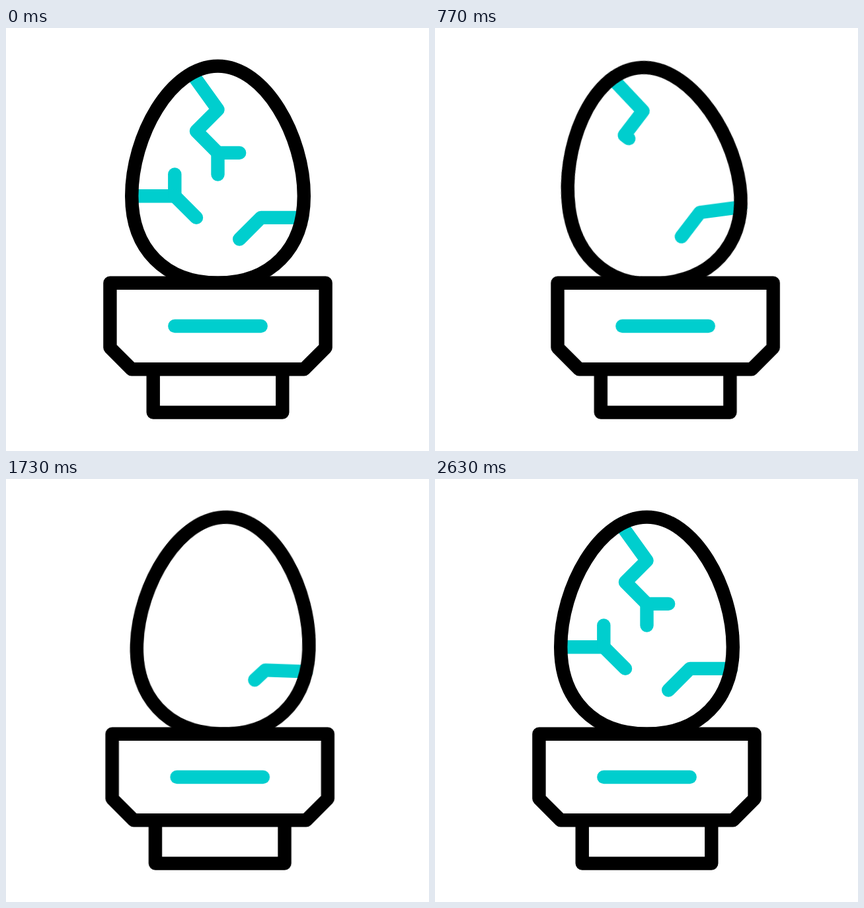
An HTML page without scripts for the animation above (2.97 s loop, 640 by 640 pixels).

```html
<!DOCTYPE html>
<html lang="en">
<head>
<meta charset="utf-8">
<title>Egg on a pedestal</title>
<style>
  html, body { margin: 0; width: 100%; height: 100%; overflow: hidden; background: #fff; }
  svg { display: block; width: 100vw; height: 100vh; }

  path { fill: none; stroke: #000; stroke-width: 20.4; stroke-linecap: round; stroke-linejoin: round; }
  .base { fill: #fff; }
  .accent path, path.accent { stroke: #00cece; }

  .scene, .egg, .trim {
    animation: 2970ms cubic-bezier(.333, 0, .667, 1) infinite;
  }
  .scene { animation-name: slide; }
  .egg { animation-name: rock; transform-origin: 320.5px 381px; }

  /* An offset just above 1 also hides the round cap. */
  .trim { stroke-dasharray: 1 2; }
  .left { animation-name: left; }
  .left-twig { animation-name: left-twig; }
  .top { animation-name: top; }
  .top-twig { animation-name: top-twig; }
  .right { animation-name: right; }
  .sweep { animation-name: sweep; }

  @keyframes slide {
    0%, 78.56%, 100% { transform: translateX(0); }
    11.22% { transform: translateX(-28.8px); }
    22.5% { transform: translateX(40.4px); }
    33.67% { transform: translateX(-13.5px); }
    44.89% { transform: translateX(21.2px); }
    56.12% { transform: translateX(3px); }
    67.34% { transform: translateX(5.1px); }
  }
  @keyframes rock {
    0%, 2.24%, 80.8%, 100% { transform: rotate(0deg); }
    13.47% { transform: rotate(8deg); }
    24.69% { transform: rotate(-8deg); }
    35.91% { transform: rotate(4deg); }
    47.14% { transform: rotate(-4deg); }
    58.36% { transform: rotate(2deg); }
    69.58% { transform: rotate(-2deg); }
  }

  @keyframes left-twig {
    0%, 88.5%, 100% { stroke-dashoffset: 0; }
    10.1%, 79.7% { stroke-dashoffset: 1.01; }
  }
  @keyframes left {
    0%, 10.1%, 79.7%, 100% { stroke-dashoffset: 0; }
    21.3%, 69.6% { stroke-dashoffset: 1.01; }
  }
  @keyframes top-twig {
    0%, 12.3%, 78.6%, 100% { stroke-dashoffset: 0; }
    22.4%, 69.6% { stroke-dashoffset: 1.01; }
  }
  @keyframes top {
    0%, 22.4%, 69.5%, 100% { stroke-dashoffset: 0; }
    33.7%, 58.4% { stroke-dashoffset: 1.01; }
  }
  @keyframes right {
    0%, 26.9%, 61.7%, 100% { stroke-dashoffset: 0; }
    37%, 50.5% { stroke-dashoffset: 1.01; }
  }
  @keyframes sweep {
    0%, 31.3% { stroke-dashoffset: 1.01; }
    42% { stroke-dashoffset: 0; }
    52.7%, 100% { stroke-dashoffset: -1.01; }
  }
</style>
</head>
<body>
<svg viewBox="0 0 640 640">
  <g class="scene">
    <g class="egg">
      <g class="accent">
        <path class="trim top" pathLength="1" d="M281 68.5L320.5 123.4L287.9 156L320.5 188.9"/>
        <path class="trim top-twig" pathLength="1" d="M320.5 188.9h32.7"/>
        <path class="trim top-twig" pathLength="1" d="M320.5 188.9v32.7"/>
        <path class="trim left" pathLength="1" d="M190.2 254.2H255.3"/>
        <path class="trim left-twig" pathLength="1" d="M255.3 254.2v-32.7"/>
        <path class="trim left-twig" pathLength="1" d="M255.3 254.2l32.7 32.7"/>
        <path class="trim right" pathLength="1" d="M448 286.9H385.8l-32.6 32.6"/>
      </g>
      <path d="M320.5 57.6C248.5 57.6 190.2 164 190.2 254.2C190.2 334 240.5 385.7 320.5 385.7S450.8 334 450.8 254.2C450.8 164 392.5 57.6 320.5 57.6Z"/>
    </g>
    <path class="base" d="M222.7 516.3v65.3h195.6v-65.3"/>
    <path class="base" d="M157.4 385.7H483.6v97.9L451 516.3H190L157.4 483.6Z"/>
    <path class="accent" d="M255.3 451H385.7"/>
    <path class="trim sweep" pathLength="1" d="M255.3 451H385.7"/>
  </g>
</svg>
</body>
</html>
```
